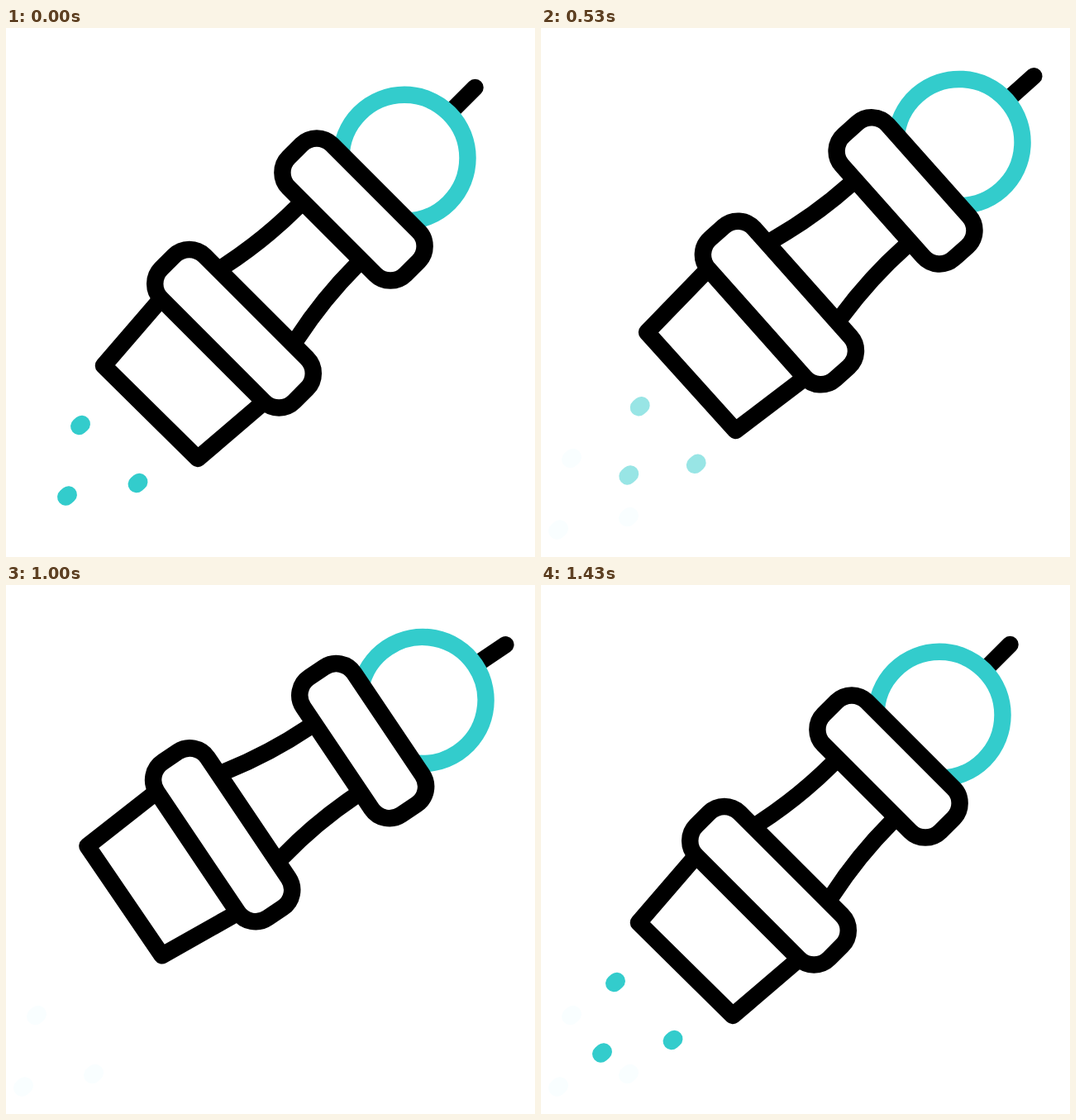
Recreate the animation shown at these times as an HTML page. Size 640x640 px, loop 1.67 s.

```html
<!DOCTYPE html>
<html lang="en">
<head>
<meta charset="utf-8">
<title>Shaker</title>
<style>
  html, body { margin: 0; height: 100%; overflow: hidden; background: #fff; }
  svg { display: block; width: 100%; height: 100%; }
</style>
</head>
<body>
<svg viewBox="0 0 640 640" fill="none" stroke-width="20.5" stroke-linecap="round" stroke-linejoin="round">
  <g id="residue" stroke="#f9feff">
    <path d="M35.3 522l3.4-3M104.3 593l3.4-3M19.3 608.5l3.4-3"/>
  </g>
  <g id="dots" stroke="#3cc">
    <path d="M-1.7 1.5l3.4-3"/>
    <path d="M-1.7 1.5l3.4-3"/>
    <path d="M-1.7 1.5l3.4-3"/>
  </g>
  <g id="shaker" stroke="#000">
    <path d="M567.5 72L540 99.5"/>
    <circle cx="482" cy="157.3" r="76.5" stroke="#3cc"/>
    <path d="M353 216Q313 256 264 288M424 287Q384 327 352 376"/>
    <path d="M184 332L118 408.5L232 521L308 456"/>
    <g fill="#fff">
      <rect x="-100" y="-37" width="200" height="74" rx="26" transform="translate(420.5 219.5) rotate(45)"/>
      <rect x="-113.7" y="-37" width="227.4" height="74" rx="26" transform="translate(276 363.7) rotate(45)"/>
    </g>
  </g>
</svg>
<script>
const LOOP = 1670, LAST_STEP = 43;
const shaker = document.getElementById('shaker');
const residue = document.getElementById('residue');
const drops = [...document.querySelectorAll('#dots path')];

// Rest position, length of the first fall in steps, and velocity of the second fall
const dropSpecs = [
  { x: 90, y: 480.5, fall: 8, vx: -6.5, vy: 5 },
  { x: 159.5, y: 550.5, fall: 6, vx: -7.5, vy: 4.7 },
  { x: 74, y: 566, fall: 10, vx: -4.8, vy: 3.4 },
];

const clamp = v => Math.max(0, Math.min(1, v));
const ease = v => { v = clamp(v); return v * v * (3 - 2 * v); };
const swing = (step, peak) => ease(1 - Math.abs(step - peak) / 9);

function poseShaker(step) {
  const peak = 30.88;
  const a = swing(step, 12), b = swing(step, peak);
  const bow = step < peak ? 16 : 9; // the second swing leaves on a wider arc
  const x = 25.5 * a - 6 * b - bow * b * (1 - b);
  const y = -49 * a - 53.5 * b;
  shaker.setAttribute('transform',
    `translate(${x} ${y}) rotate(${5.7 * a + 11.4 * b} 320 320)`);
}

// Offset from rest and opacity
function dropState(step, d) {
  if (step < 14) {
    const p = ease((step - 3) / d.fall);
    return [-53.5 * p, 40.5 * p, clamp(2 - 2 * p)];
  }
  if (step < 30) {
    const t = step - 14.5;
    return [39.5 + d.vx * t, -30.2 + d.vy * t,
      Math.min(clamp(t / 3), clamp((25.1 - step) / 3.2))];
  }
  const left = LAST_STEP - step;
  return [6.5 * left, -5 * left, clamp((step - 35) / 6)];
}

function draw(now) {
  const step = Math.min(LAST_STEP, Math.floor((now % LOOP + 5) * 0.03));
  poseShaker(step);
  residue.style.display = step < 13 ? 'none' : '';
  dropSpecs.forEach((d, i) => {
    const [dx, dy, alpha] = dropState(step, d);
    drops[i].setAttribute('transform', `translate(${d.x + dx} ${d.y + dy})`);
    drops[i].setAttribute('opacity', alpha);
  });
}

const start = performance.now();
function tick() {
  draw(performance.now() - start);
  requestAnimationFrame(tick);
}
tick();
</script>
</body>
</html>
```
